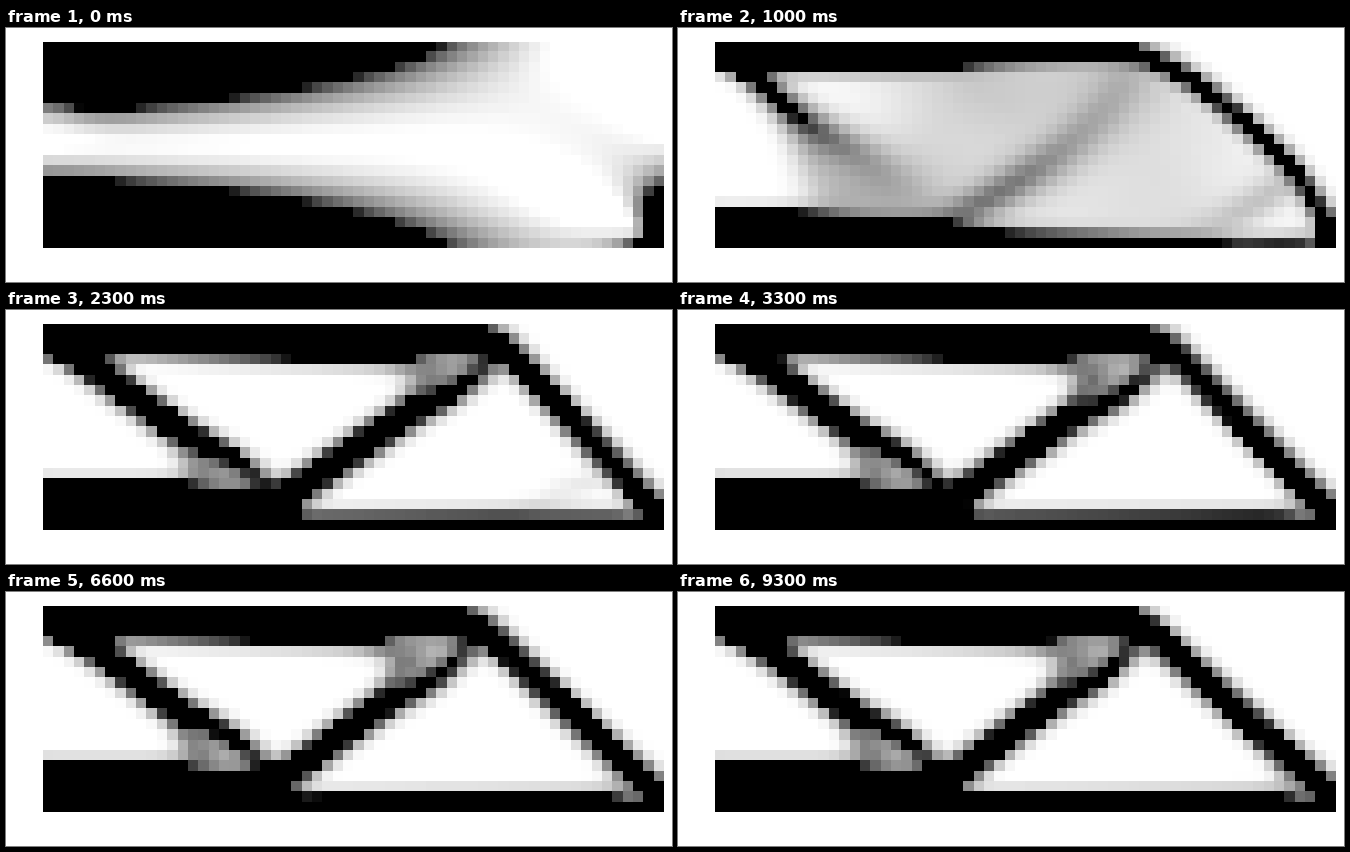
Recreate the animation shown at these times as a matplotlib script. Size 666x254 px, loop 9400 ms.

```python
"""Topology optimisation of a half MBB beam (SIMP, sensitivity filter)."""
import numpy as np
import matplotlib.pyplot as plt
from matplotlib.animation import FuncAnimation

WIDTH, HEIGHT, DPI = 666, 254, 100
NX, NY = 60, 20
STEPS, INTERVAL = 94, 100
VOLUME, PENAL, RADIUS = 0.5, 3.0, 1.5
X_MIN, NU, MOVE = 0.001, 0.3, 0.2

# Beam placement on the stage, in pixels
LEFT, RIGHT, TOP, BOTTOM = 37, 658, 14, 220
CELL, X0, Y0 = 10.35, 36.97, 13.0


def element_stiffness():
    """Plane-stress unit square, ordered as left column then right column."""
    k = np.array([1/2 - NU/6, 1/8 + NU/8, -1/4 - NU/12, -1/8 + 3*NU/8,
                  -1/4 + NU/12, -1/8 - NU/8, NU/6, 1/8 - 3*NU/8])
    order = ["01234567", "10765432", "27056341", "36507214",
             "45670123", "54321076", "63412705", "72143650"]
    ke = np.array([[k[int(i)] for i in row] for row in order]) / (1 - NU**2)
    perm = [6, 7, 0, 1, 4, 5, 2, 3]
    return ke[np.ix_(perm, perm)]


KE = element_stiffness()
ROWS = [slice(2*r, 2*r + 4) for r in range(NY)]


def displacements(x):
    """Solve the block tridiagonal system, one block per column of nodes."""
    n = 2 * (NY + 1)
    diag = np.zeros((NX + 1, n, n))
    off = np.zeros((NX, n, n))
    for s, e in zip(ROWS, x**PENAL):
        e = e[:, None, None]
        diag[:-1, s, s] += e * KE[:4, :4]
        diag[1:, s, s] += e * KE[4:, 4:]
        off[:, s, s] += e * KE[:4, 4:]

    # Symmetry on the left edge, roller at the lower right corner
    for col, fixed in ((0, np.arange(0, n, 2)), (NX, np.array([n - 1]))):
        diag[col][fixed, :] = 0
        diag[col][:, fixed] = 0
        diag[col][fixed, fixed] = 1
    off[0][::2, :] = 0
    off[-1][:, n - 1] = 0

    u = np.zeros((NX + 1, n))
    u[0, 1] = -1
    carry = np.zeros((NX, n, n))
    for c in range(NX + 1):
        block = diag[c]
        if c:
            block = block - off[c - 1].T @ carry[c - 1]
            u[c] -= off[c - 1].T @ u[c - 1]
        if c < NX:
            sol = np.linalg.solve(block, np.column_stack([off[c], u[c]]))
            carry[c], u[c] = sol[:, :-1], sol[:, -1]
        else:
            u[c] = np.linalg.solve(block, u[c])
    for c in range(NX - 1, -1, -1):
        u[c] -= carry[c] @ u[c + 1]
    return u


def smooth(a):
    """Sum of neighbours under a cone of the filter radius."""
    m = int(np.ceil(RADIUS)) - 1
    padded = np.pad(a, m)
    out = np.zeros_like(a)
    for i in range(-m, m + 1):
        for j in range(-m, m + 1):
            weight = max(0.0, RADIUS - np.hypot(i, j))
            out += weight * padded[m + i:m + i + NY, m + j:m + j + NX]
    return out


WEIGHTS = smooth(np.ones((NY, NX)))


def update(x):
    """One optimality-criteria step."""
    u = displacements(x)
    energy = np.empty_like(x)
    for r, s in enumerate(ROWS):
        ue = np.hstack([u[:-1, s], u[1:, s]])
        energy[r] = ((ue @ KE) * ue).sum(axis=1)
    gain = PENAL * x**(PENAL - 1) * np.maximum(energy, 0)
    gain = smooth(x * gain) / WEIGHTS / x

    low, high = 0.0, 1e5
    while high - low > 1e-4:
        mid = (low + high) / 2
        new = np.clip(x * np.sqrt(gain / mid), x - MOVE, x + MOVE)
        new = np.clip(new, X_MIN, 1)
        if new.sum() > VOLUME * x.size:
            low = mid
        else:
            high = mid
    return new


designs = []
density = np.full((NY, NX), VOLUME)
for _ in range(STEPS):
    density = update(density)
    designs.append(density)

cols = ((np.arange(LEFT, RIGHT) + 0.5 - X0) / CELL).astype(int).clip(0, NX - 1)
rows = ((np.arange(TOP, BOTTOM) + 0.5 - Y0) / CELL).astype(int).clip(0, NY - 1)


def shade(x):
    """Linear light of the empty share, encoded as sRGB grey."""
    light = (x.max() - x) / (x.max() - x.min())
    grey = np.where(light <= 0.0031308, 12.92 * light,
                    1.055 * light**(1 / 2.4) - 0.055)
    return grey[np.ix_(rows, cols)]


fig = plt.figure(figsize=(WIDTH / DPI, HEIGHT / DPI), dpi=DPI, facecolor="white")
image = fig.figimage(shade(designs[0]), xo=LEFT, yo=HEIGHT - BOTTOM,
                     cmap="gray", vmin=0, vmax=1, origin="upper")


def draw(i):
    image.set_data(shade(designs[i]))
    return [image]


anim = FuncAnimation(fig, draw, frames=STEPS, interval=INTERVAL,
                     repeat=True, repeat_delay=0, blit=False)
plt.show()
```
